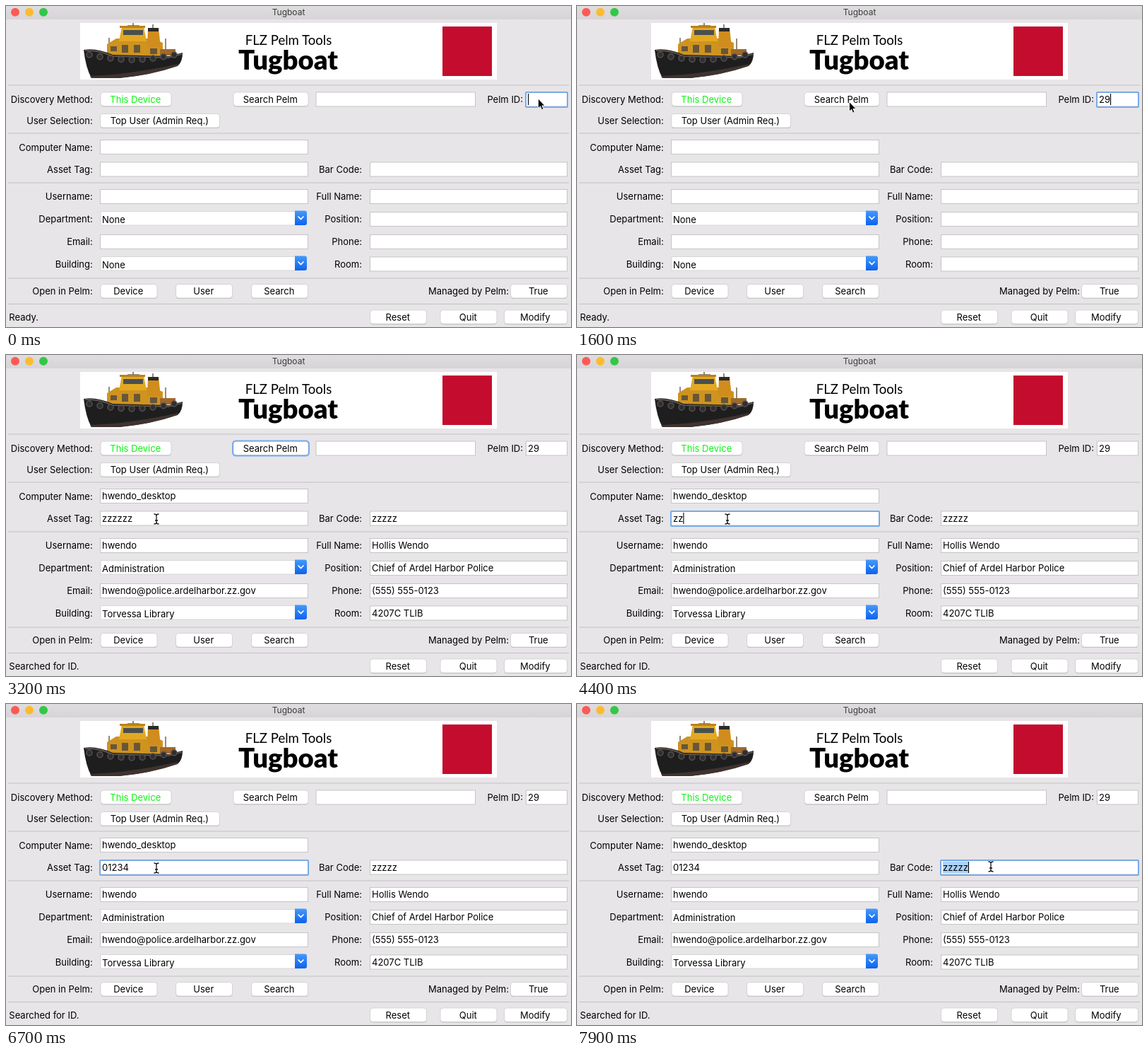
Recreate the animation shown at these times as an HTML page. Size 800 px wide and 454 px high, loop 8000 ms.

```html
<!DOCTYPE html>
<html lang="en">
<head>
<meta charset="utf-8">
<title>Tugboat</title>
<style>
  html, body { margin: 0; width: 100%; height: 100%; overflow: hidden; background: #e7e5e7; }
  svg { display: block; width: 800px; height: 454px; }
  text { font: 13px Inter, "Liberation Sans", sans-serif; fill: #000; white-space: pre; }
  .title { font-size: 12px; fill: #3c3c3c; }
  .suite { font: 18.6px Lato, "Open Sans", sans-serif; }
  .name { font: 900 38.3px Lato, "Open Sans", sans-serif; }
  .field { fill: #fff; stroke: #c6c5c6; }
  .button { fill: #fff; stroke: #cfcdcf; stroke-width: .8; }
  .shade { fill: #bcbabc; }
  .ring { fill: none; stroke: #78aaea; stroke-width: 2; }
  .rule { stroke: #c2c0c2; }
</style>
</head>
<body>
<svg id="stage" viewBox="0 0 800 454">
  <defs>
    <linearGradient id="bar" x2="0" y2="1">
      <stop stop-color="#dfdddf"/><stop offset="1" stop-color="#d6d4d6"/>
    </linearGradient>
    <linearGradient id="blue" x2="0" y2="1">
      <stop stop-color="#459afb"/><stop offset="1" stop-color="#0b62ee"/>
    </linearGradient>
  </defs>
  <rect width="800" height="454" fill="#e7e5e7"/>
  <rect width="800" height="19" fill="url(#bar)"/>
  <circle cx="13" cy="8.7" r="6" fill="#fc5a56"/>
  <circle cx="33" cy="8.7" r="6" fill="#fcbb2f"/>
  <circle cx="53" cy="8.7" r="6" fill="#33c748"/>
  <rect x="105" y="24" width="590" height="80" fill="#fff"/>
  <g id="boat">
    <path d="M180 24V40M172 28H189M208 31V26M146 45V62M226 46V68" stroke="#71644f" stroke-width="1.5"/>
    <path d="M143 54L156 46H207L222 52V75H143Z" fill="#cf931f"/>
    <path d="M164 29H195L199 50H160Z" fill="#e3a822"/>
    <path d="M161 28H197V31H161Z" fill="#b9821d"/>
    <path d="M166 34H194V41H166Z" fill="#49504f"/>
    <path d="M201 31H216L219 58H200Z" fill="#d08c1c"/>
    <path d="M201 31H216V36H201Z" fill="#2b2926"/>
    <path d="M148 57H157V64H148ZM164 55H173V66H164ZM181 55H190V66H181ZM204 60H214V68H204Z" fill="#67563a"/>
    <path d="M218 61H240V70H218Z" fill="#a0692a"/>
    <path d="M110 62Q128 59 151 69L231 71 250 66Q250 78 244 84 205 98 160 102H121Q113 88 110 62Z" fill="#1f1e1f"/>
    <path d="M112 63Q131 62 151 71L230 73 249 68" fill="none" stroke="#685f55" stroke-width="1.5"/>
    <path d="M119 99Q175 97 244 82L243 85Q205 98 160 102H121Z" fill="#40332f"/>
  </g>
  <rect x="618" y="29" width="70" height="70" fill="#c40d2e"/>
</svg>
<script>
const LOOP = 8000, STEP = 100;
const stage = document.getElementById('stage');

function add(tag, attrs, parent = stage) {
  const el = document.createElementNS('http://www.w3.org/2000/svg', tag);
  for (const key in attrs) el.setAttribute(key, attrs[key]);
  parent.append(el);
  return el;
}

function text(str, x, y, anchor = 'start', extra = {}) {
  const el = add('text', { x, y, 'text-anchor': anchor, ...extra });
  el.textContent = str;
  return el;
}

const show = (el, on) => el.setAttribute('visibility', on ? 'visible' : 'hidden');

// Fenders along the hull
const boat = document.getElementById('boat');
for (let i = 0; i < 9; i++) {
  add('circle', { cx: 118 + i * 15, cy: 69 + 7 * Math.sin(i / 8 * Math.PI), r: 4,
    fill: '#302e2e', stroke: '#545052', 'stroke-width': 1.5 }, boat);
}

text('Tugboat', 400, 13, 'middle', { class: 'title' });
text('FLZ Pelm Tools', 400, 55, 'middle', { class: 'suite' });
text('Tugboat', 399.5, 89.5, 'middle', { class: 'name' });

for (const y of [112, 180, 250, 385, 421.5])
  add('line', { x1: 3, x2: 797, y1: y, y2: y, class: 'rule' });

// Right edge, baseline, label
const labels = [
  [122.7, 137, 'Discovery Method:'], [122.7, 167, 'User Selection:'],
  [122.7, 205, 'Computer Name:'], [122.7, 236, 'Asset Tag:'],
  [122.7, 274, 'Username:'], [122.7, 306, 'Department:'],
  [122.7, 338, 'Email:'], [122.7, 370, 'Building:'], [122.7, 408, 'Open in Pelm:'],
  [504, 236, 'Bar Code:'], [504, 274, 'Full Name:'], [504, 306, 'Position:'],
  [504, 338, 'Phone:'], [504, 370, 'Room:'],
  [732, 137, 'Pelm ID:'], [712, 408, 'Managed by Pelm:']
];
for (const [x, y, str] of labels) text(str, x, y, 'end');

function button(str, x, y, w, color = '#000') {
  add('rect', { x, y: y + 1, width: w, height: 19.6, rx: 4, class: 'shade' });
  add('rect', { x, y, width: w, height: 19.6, rx: 4, class: 'button' });
  text(str, x + w / 2 - .7, y + 14.7, 'middle', { style: `fill:${color}` });
}
button('This Device', 134, 122, 100, '#0af50f');
button('Search Pelm', 322, 122, 106);
button('Top User (Admin Req.)', 133.5, 152.5, 169);
button('Device', 134, 393.5, 80);
button('User', 240.5, 393.5, 80);
button('Search', 347.5, 393.5, 80);
button('True', 714.5, 393.5, 80);
button('Reset', 515.5, 430, 80);
button('Quit', 615, 430, 80);
button('Modify', 705.5, 430, 89);

// Entries keep their box so that the pointer can turn into a beam above them
const entries = [];
function entry(x, y, w) {
  add('rect', { x: x + .5, y: y + .5, width: w - 1, height: 20, class: 'field' });
  const mark = add('rect', { x: x + 3, y: y + 2, width: 0, height: 17, fill: '#abd2fb' });
  const value = text('', x + 3, y + 15);
  const ring = add('rect', { x, y: y + .5, width: w, height: 21, rx: 1, class: 'ring' });
  const e = { x, y, w, mark, value, ring };
  entries.push(e);
  return e;
}
function combo(y) {
  add('rect', { x: 134, y, width: 283, height: 19.5, fill: '#fff', stroke: '#d2d0d2', 'stroke-width': .8 });
  add('path', { d: `M409 ${y - 1}H423Q426 ${y - 1} 426 ${y + 2}V${y + 16.5}Q426 ${y + 19.5} 423 ${y + 19.5}H409Z`, fill: 'url(#blue)' });
  add('path', { d: `M414 ${y + 7.5}l3.5 3.5 3.5 -3.5`, fill: 'none', stroke: '#fff', 'stroke-width': 1.7, 'stroke-linecap': 'round' });
  return { value: text('None', 136, y + 16) };
}

entry(438.5, 121.5, 226.5);
const id = entry(736, 121.5, 59);
const computer = entry(133, 189, 295);
const asset = entry(133, 220.5, 295);
const code = entry(515, 220.5, 280);
const user = entry(133, 259, 295);
const fullName = entry(515, 259, 280);
const position = entry(515, 291, 280);
const email = entry(133, 323, 295);
const phone = entry(515, 323, 280);
const room = entry(515, 354.5, 280);
const department = combo(290.5);
const building = combo(354.5);
const searchRing = add('rect', { x: 321, y: 121.5, width: 108, height: 21, rx: 4.5, class: 'ring' });
const status = text('', 4.3, 444.5);
const caret = add('rect', { width: 1.1, height: 16, fill: '#000' });

const record = [
  [computer, 'hwendo_desktop'], [user, 'hwendo'], [fullName, 'Hollis Wendo'],
  [department, 'Administration', 'None'], [position, 'Chief of Ardel Harbor Police'],
  [email, 'hwendo@police.ardelharbor.zz.gov'], [phone, '(555) 555-0123'],
  [building, 'Torvessa Library', 'None'], [room, '4207C TLIB'], [code, 'zzzzz']
];

const arrow = add('path', { d: 'M0 0V13.6L3.1 10.8 5.2 15.7 7.5 14.7 5.4 10H9.6Z', fill: '#000', stroke: '#fff', 'stroke-width': .9 });
const beam = add('path', { d: 'M-3.5 -7Q0 -7 0 -5 0 -7 3.5 -7M0 -5V5M-3.5 7Q0 7 0 5 0 7 3.5 7M-2 2H2', fill: 'none', stroke: '#111', 'stroke-width': 1.3 });

// Start, end, from, to
const moves = [
  [900, 1500, [753.5, 131], [385.5, 135.5]],
  [2500, 3100, [385.5, 135.5], [213, 232]],
  [6900, 7500, [213, 232], [586, 230]]
];
function pointer(t) {
  let at = moves[0][2];
  for (const [start, end, from, to] of moves) {
    if (t < start) break;
    const p = Math.min(1, (t - start) / (end - start));
    const k = p * p * (3 - 2 * p);
    at = from.map((v, i) => v + (to[i] - v) * k);
  }
  return at;
}

const SEARCH = 1900, FILL = 2300, ASSET = 3400, CODE = 7700;
const idKeys = [[0, ''], [500, '2'], [700, '29']];
const assetKeys = [
  [0, ''], [FILL, 'zzzzzz'], [ASSET, 'zzzzzz'],
  ...Array.from({ length: 6 }, (_, i) => [3700 + i * 200, 'z'.repeat(5 - i)]),
  ...Array.from({ length: 5 }, (_, i) => [5700 + i * 100, '01234'.slice(0, i + 1)])
];
const latest = (keys, t) => keys.filter(([at]) => at <= t).pop();

function draw(t) {
  const [idTime, idText] = latest(idKeys, t);
  const [assetTime, assetText] = latest(assetKeys, t);
  const filled = t >= FILL;
  id.value.textContent = idText;
  asset.value.textContent = assetText;
  for (const [e, full, empty = ''] of record) e.value.textContent = filled ? full : empty;
  status.textContent = filled ? 'Searched for ID.' : 'Ready.';

  const [focus, since] = t < SEARCH ? [id, idTime]
    : t < ASSET ? [null, 0]
    : t < CODE ? [asset, assetTime] : [code, CODE];
  for (const e of entries) show(e.ring, e === focus);
  show(searchRing, !focus);

  show(caret, focus && (t - since) % 900 < 600);
  if (focus) {
    caret.setAttribute('x', focus.x + 3 + focus.value.getComputedTextLength());
    caret.setAttribute('y', focus.y + 2.5);
  }
  code.mark.setAttribute('width', focus === code ? code.value.getComputedTextLength() : 0);

  const [x, y] = pointer(t);
  const over = entries.some(e => e !== id && x > e.x && x < e.x + e.w && y > e.y && y < e.y + 21);
  show(arrow, !over);
  show(beam, over);
  for (const el of [arrow, beam]) el.setAttribute('transform', `translate(${x} ${y})`);
}

const begin = performance.now();
function tick() {
  const t = (performance.now() - begin) % LOOP;
  draw(Math.floor(t / STEP) * STEP);
  requestAnimationFrame(tick);
}
tick();
</script>
</body>
</html>
```
